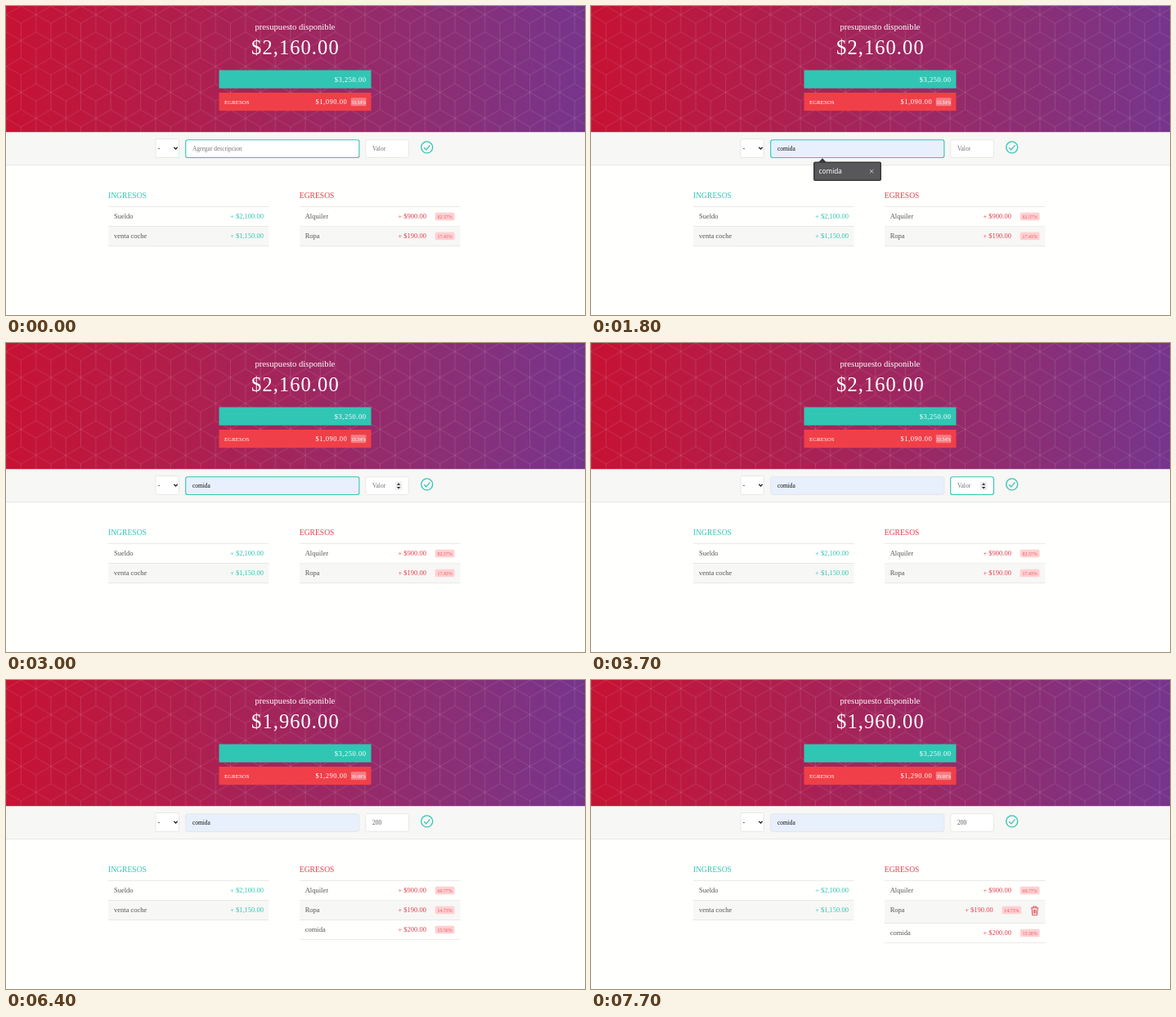
An HTML page for the animation above (8000 ms loop, 708 px wide and 378 px high).

```html
<!DOCTYPE html>
<html lang="es">
<head>
<meta charset="utf-8">
<title>Presupuesto</title>
<style>
html, body { margin: 0; width: 100%; height: 100%; overflow: hidden; background: #fffffd; }
svg { display: block; width: 100%; height: 100%; font-family: "Liberation Serif", serif; }
text { white-space: pre; }
.sans { font-family: "Noto Sans", sans-serif; font-weight: 500; }
</style>
</head>
<body>
<svg viewBox="0 0 708 378">
  <defs>
    <linearGradient id="sky" x1="0" y1="0" x2="1" y2="0">
      <stop offset="0" stop-color="#c71233"/>
      <stop offset=".25" stop-color="#b41c48"/>
      <stop offset=".5" stop-color="#a0265e"/>
      <stop offset=".75" stop-color="#8b2e74"/>
      <stop offset="1" stop-color="#76358c"/>
    </linearGradient>
    <pattern id="cubes" width="36.6" height="63.4" patternUnits="userSpaceOnUse">
      <path id="cube" fill="none" stroke="#fff" stroke-opacity=".2" stroke-width=".6"/>
    </pattern>
  </defs>
  <g id="page"></g>
  <g id="live"></g>
</svg>
<script>
const LOOP = 8000;
const TEAL = '#31c6b4', RED = '#e5414f', INK = '#555', HINT = '#757575', LINE = '#e4e4e2';
const $ = id => document.getElementById(id);

const text = (x, y, str, size, fill, extra = '') =>
  `<text x="${x}" y="${y}" font-size="${size}" fill="${fill}" ${extra}>${str}</text>`;
const rect = (x, y, w, h, fill, extra = '') =>
  `<rect x="${x}" y="${y}" width="${w}" height="${h}" fill="${fill}" ${extra}/>`;
const path = (d, stroke, width = 1, fill = 'none') =>
  `<path d="${d}" stroke="${stroke}" stroke-width="${width}" fill="${fill}"/>`;
const rule = (x, y, w) => path(`M${x} ${y}h${w}`, LINE, .8);
const END = 'text-anchor="end"', MID = 'text-anchor="middle"', WIDE = 'letter-spacing=".53"';

// Rhombille tile: w is the cube width, s its edge
function cubePath(w, s) {
  const h = w / 2;
  return `M0 ${s / 2}L${h} 0L${w} ${s / 2}L${h} ${s}L0 ${s / 2}` +
    `M0 ${1.5 * s}L${h} ${2 * s}L${w} ${1.5 * s}` +
    `M0 ${2.5 * s}L${h} ${2 * s}L${w} ${2.5 * s}` +
    `M${h} ${s}V${3 * s}M0 0V${1.5 * s}M0 ${2.5 * s}V${3 * s}` +
    `M${w} 0V${1.5 * s}M${w} ${2.5 * s}V${3 * s}`;
}

function field(x, w, focus, fill = '#fff') {
  return rect(x, 163.7, w, 21.8, fill,
    `rx="2.6" stroke="${focus ? TEAL : LINE}" stroke-width="${focus ? 1.1 : .8}"`);
}

const caret = x => rect(x, 170.2, .7, 8.8, '#222');

function incomeRow(y, name, value) {
  return text(132, y + 14.8, name, 8.5, INK) +
    text(315, y + 14.8, value, 8.5, TEAL, END) + rule(125, y + 24, 196.5);
}

function drawPage() {
  return rect(0, 0, 708, 154.5, 'url(#sky)') + rect(0, 0, 708, 154.5, 'url(#cubes)') +
    text(353.4, 29.3, 'presupuesto disponible', 10.65, '#fff', MID) +
    rect(260.5, 78.5, 186, 22.2, TEAL) +
    text(440.5, 92.8, '$3,250.00', 8.5, '#fff', END + ' ' + WIDE) +
    rect(260.5, 106, 186, 22.2, '#f03f48') +
    text(267, 120, 'EGRESOS', 6.9, '#fff') +
    rect(0, 154.5, 708, 40, '#f7f7f5') + rule(0, 194.5, 708) +
    rect(183, 162.5, 28.5, 23, '#fff', `rx="1" stroke="${LINE}" stroke-width=".8"`) +
    text(185.6, 176.6, '-', 8.5, '#222') +
    path('M205.3 172.8l2.2 2.2l2.2 -2.2', '#222', 1.3) +
    `<circle cx="514.7" cy="172.9" r="7" fill="none" stroke="${TEAL}" stroke-width="1.3"/>` +
    path('M511.2 173.2l2.6 2.7l4.7 -5.6', TEAL, 1.3) +
    text(125, 234.6, 'INGRESOS', 9.6, TEAL) + text(358.8, 234.6, 'EGRESOS', 9.6, RED) +
    rule(125, 245.5, 196.5) + rect(125, 269.5, 196.5, 24, '#f7f7f5') +
    incomeRow(245.5, 'Sueldo', '+ $2,100.00') + incomeRow(269.5, 'venta coche', '+ $1,150.00');
}

// CSS "ease" curve
function ease(p) {
  if (p <= 0) return 0;
  if (p >= 1) return 1;
  const bez = (u, a, b) => 3 * u * (1 - u) ** 2 * a + 3 * u * u * (1 - u) * b + u ** 3;
  let lo = 0, hi = 1;
  for (let i = 0; i < 20; i++) {
    const m = (lo + hi) / 2;
    if (bez(m, .25, .25) < p) lo = m; else hi = m;
  }
  return bez(lo, .1, 1);
}

const slide = (t, start) => 10.7 * ease((t - start) / 300);

function trash(y) {
  return path(`M538 ${y + 2}h9.2M540.7 ${y + 2}v-1.7h3.8v1.7M539 ${y + 2}l.6 8.8h6l.6 -8.8` +
    `M541.1 ${y + 4}v5M542.6 ${y + 4}v5M544.1 ${y + 4}v5`, RED, .9);
}

function expenses(t, added) {
  const hover = t >= 7400 ? 1 : t >= 7300 ? 0 : -1;
  const share = added ? ['69.77%', '14.73%', '15.50%'] : ['82.57%', '17.43%'];
  const items = [['Alquiler', '900'], ['Ropa', '190'], ['comida', '200']];
  const shift = [slide(t, 7300), slide(t, 7400), 0];
  if (hover === 1) shift[0] = slide(7400, 7300) * (1 - ease((t - 7400) / 100));
  let y = 245.5, out = rule(359, y, 196.5);
  share.forEach((pct, i) => {
    const on = i === hover, h = on ? 28 : 24;
    const dx = -(shift[i] + (on ? 11.6 : 0));
    if (i === 1) out += rect(359, y, 196.5, h, '#f7f7f5');
    out += text(365.7, y + 14.8, items[i][0], 8.5, INK) +
      text(514 + dx, y + 14.8, `+ $${items[i][1]}.00`, 8.5, RED, END) +
      rect(524.8 + dx, y + 7.3, 23.7, 9.5, '#ffd0d2', 'rx="1.6"') +
      text(536.6 + dx, y + 14.2, pct, 5.85, '#ee5660', MID);
    if (on) out += trash(y + 7.3);
    y += h;
    out += rule(359, y, 196.5);
  });
  return out;
}

function popup(hover) {
  const fill = hover ? '#58585a' : '#26262b', edge = hover ? '#3a3a3c' : '#26262b';
  return path('M277.8 191.5L283 186.2L288.2 191.5Z', 'none', 0, edge) +
    rect(272.8, 191.3, 81.4, 22, fill, `rx="1.2" stroke="${edge}" stroke-width="1.6"`) +
    text(278.6, 205.2, 'comida', 8.2, '#fff', 'class="sans"') +
    (hover ? path('M340.9 200l4.4 4.4m0 -4.4l-4.4 4.4', '#d0d0d0', .9) : '');
}

function spinner() {
  return rect(476, 169.5, 8.3, 10.5, '#efefef') +
    path('M477.8 173.7L480.1 171.2L482.4 173.7ZM477.8 175.9L480.1 178.4L482.4 175.9Z', 'none', 0, '#333');
}

function form(t) {
  const filled = t >= 1700, valueFocus = t >= 3100 && t < 6000;
  const typed = t < 4200 ? '' : t < 4300 ? '2' : t < 4500 ? '20' : '200';
  let out = field(219.7, 212.2, t < 3100, filled ? '#e7f0fc' : '#fff') +
    text(228, 176.9, filled ? 'comida' : 'Agregar descripcion', 7.45, filled ? '#111' : HINT) +
    field(439.7, 52.8, valueFocus) +
    text(448, 176.9, typed || 'Valor', 7.45, typed ? INK : HINT);
  if (t >= 900 && t < 1700) out += caret(228);
  if (t >= 2300 && t < 2800) out += caret(250);
  if (valueFocus && (t < 3700 || t >= 4200 && t < 5100 || t >= 5700))
    out += caret(448 + typed.length * 3.73);
  if (t >= 2900 && t < 6000) out += spinner();
  if (t >= 1000 && t < 2400) out += popup(filled);
  return out;
}

function totals(added) {
  return text(353.9, 59.4, added ? '$1,960.00' : '$2,160.00', 24.5, '#fff', MID + ' letter-spacing="1.07"') +
    text(417.3, 120.4, added ? '$1,290.00' : '$1,090.00', 8.5, '#fff', END + ' ' + WIDE) +
    rect(421.8, 112.2, 18.6, 10, '#fff', 'fill-opacity=".33" rx="1"') +
    text(431.1, 119.6, added ? '39.69%' : '33.54%', 5.85, '#fff', MID);
}

let last = '';
function render(t) {
  const added = t >= 6200;
  const out = totals(added) + expenses(t, added) + form(t);
  if (out !== last) $('live').innerHTML = last = out;
}

$('cube').setAttribute('d', cubePath(36.6, 63.4 / 3));
$('page').innerHTML = drawPage();
const start = performance.now();
function tick() {
  render((performance.now() - start) % LOOP);
  requestAnimationFrame(tick);
}
tick();
</script>
</body>
</html>
```
